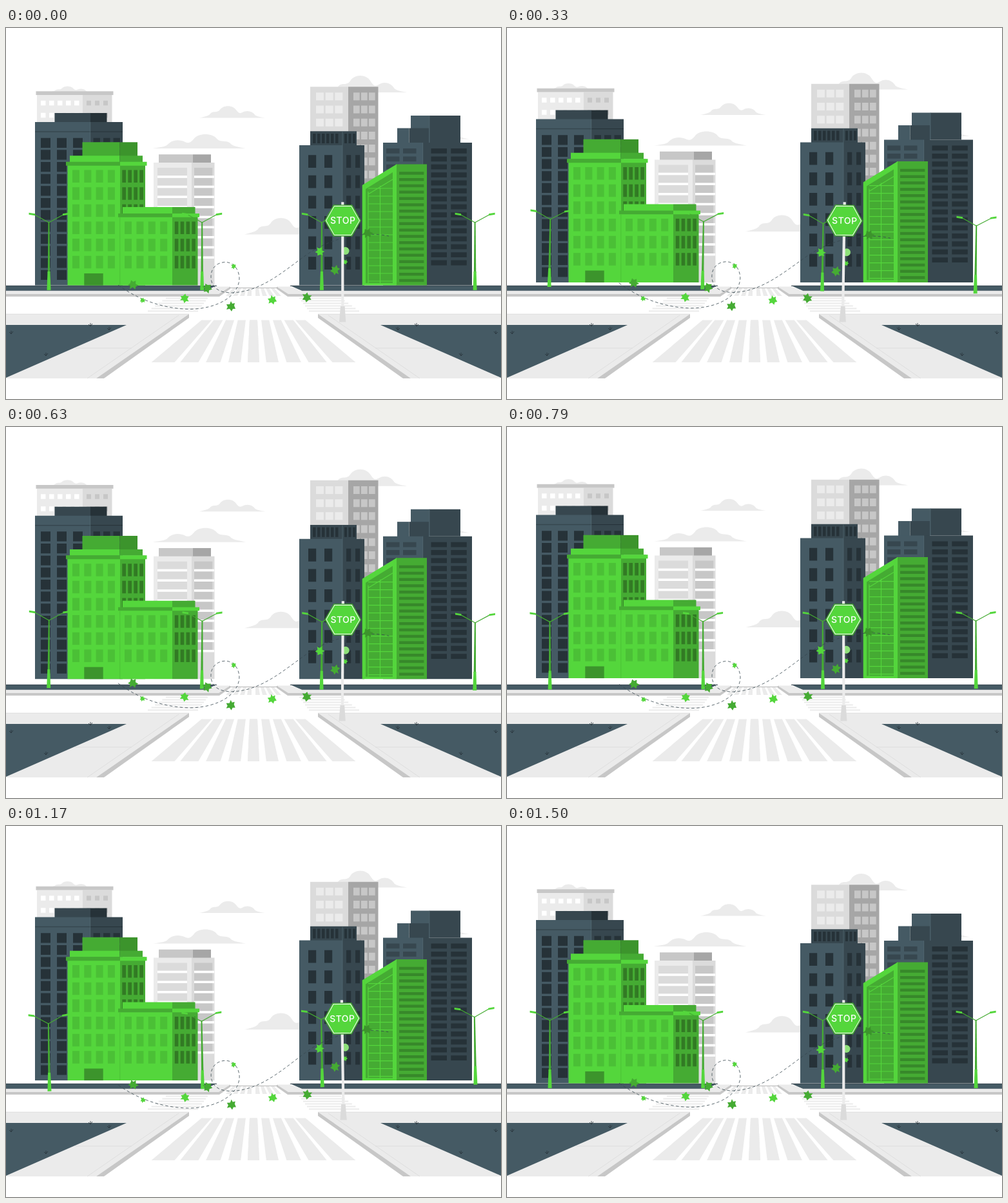
Recreate the animation shown at these times as an HTML page. Size 768x576 px, loop 1.54 s.

```html
<!DOCTYPE html>
<html lang="en">
<head>
<meta charset="utf-8">
<title>City crossing</title>
<style>
  html, body { margin: 0; width: 100%; height: 100%; overflow: hidden; background: #fff; }
  svg { display: block; width: 768px; height: 576px; }
</style>
</head>
<body>
<svg id="stage" viewBox="0 0 768 576"></svg>
<script>
const BRIGHT = '#54d63c', GREEN = '#45ab33', DEEP = '#3c942c', SHADE = '#327a24', SOFT = '#4bc036';
const SLATE = '#455a64', DARK = '#37474f', NIGHT = '#263238', SEAM = '#546a74';
const PALE = '#ebebeb', LIGHT = '#dbdbdb', GREY = '#c7c7c7', STONE = '#a6a6a6', WHITE = '#fff';
const BASE = 399.5;

const repeat = (count, draw) => Array.from({ length: count }, (_, i) => draw(i)).join('');
const path = (d, fill) => `<path d="${d}" fill="${fill}"/>`;
const poly = (points, fill) => path(`M${points}Z`, fill);
const line = (d, color, width = 1) => `<path d="${d}" fill="none" stroke="${color}" stroke-width="${width}"/>`;
const box = (x1, y1, x2, y2, fill) => path(`M${x1} ${y1}H${x2}V${y2}H${x1}Z`, fill);
const mirrored = shape => shape + `<g transform="matrix(-1 0 0 1 768 0)">${shape}</g>`;

// Two neighbouring faces of a block, split at x2
const block = (x1, x2, x3, top, bottom, left, right) =>
  box(x1, top, x2, bottom, left) + box(x2, top, x3, bottom, right);

// Each axis: [start, size, step, count]
const grid = ([x, w, dx, columns], [y, h, dy, rows], fill) =>
  path(repeat(rows, r => repeat(columns, c => `M${x + c * dx} ${y + r * dy}h${w}v${h}h${-w}z`)), fill);

// A negative width turns the cloud round
const cloud = (x, base, w, h) =>
  `<path transform="translate(${x} ${base}) scale(${w / 100} ${h / 18})" fill="${PALE}"
    d="M0 0C8-2 15-3 17-7C22-11 27-7 31-12C36-20 51-20 56-12C59-8 61-6 65-8C72-12 80-11 85-4C90-1 96-1 100 0Z"/>`;
const clouds = cloud(65, 100, 70, 9.5) + cloud(300, 139.5, 102, 18.3) + cloud(372, 187, -144, 22) +
  cloud(370, 320.5, 130, 25.5) + cloud(494, 100, 128, 26) + cloud(617, 172.5, 102, 18);

function leftTowers() {
  const small = [112.7, 7.5, 19, 2], tall = [170.7, 15.2, 18.65, 12];
  return block(48, 119, 164.5, 104, 150, PALE, LIGHT) + box(46.5, 98.3, 166.5, 104, GREY) +
    grid([54, 7.5, 13, 5], small, WHITE) + grid([125, 7, 13, 3], small, GREY) +
    block(75.5, 131, 156.5, 132, 147, DARK, NIGHT) +
    block(45, 131, 181, 146, BASE, SLATE, DARK) +
    line('M45 161H131', DARK, 1.5) + line('M131 161H181', NIGHT) + line(`M130.7 146V${BASE}`, SEAM, .7) +
    grid([54, 15, 25, 3], tall, NIGHT) + grid([135.5, 10.5, 15.5, 3], tall, NIGHT);
}

function paleOffice() {
  const bars = [217, 12.2, 15.65, 9], gaps = [229.2, 3.5, 15.65, 9];
  return block(237, 290, 318, 196.3, 210, GREY, STONE) + block(229, 288, 323.5, 209, BASE, PALE, LIGHT) +
    grid([235, 46, 0, 1], bars, LIGHT) + grid([292, 28.3, 0, 1], bars, GREY) +
    grid([235, 46, 0, 1], gaps, WHITE) + grid([292, 31, 0, 1], gaps, WHITE);
}

function greenHouses() {
  const tall = [220.5, 19.5, 26.65, 6], low = [300.5, 19.5, 26.65, 3];
  return block(118.5, 176.5, 204, 177.3, 199, GREEN, DEEP) + block(99, 176.5, 212, 198.3, 208, BRIGHT, GREEN) +
    block(95.5, 177, 216, 208, BASE, BRIGHT, GREEN) + block(93, 177, 218.5, 207.7, 213.7, GREEN, BRIGHT) +
    grid([103, 11, 18.3, 4], tall, SOFT) + grid([180.3, 5.7, 9, 4], tall, SHADE) +
    box(121.3, 381, 150.7, BASE, DEEP) +
    block(181, 258, 293.5, 278, 289, BRIGHT, GREEN) + block(177, 258, 297.5, 290, BASE, BRIGHT, GREEN) +
    block(174, 258, 300, 288, 293.7, GREEN, BRIGHT) + line(`M176.8 294V${BASE}`, SOFT) +
    grid([184, 11, 18.4, 4], low, SOFT) + grid([261.8, 5.6, 8.85, 4], low, SHADE);
}

function rightTowers() {
  const high = [100.3, 12, 20.2, 8], middle = [197.2, 19.8, 31.6, 6], slats = [164, 15, 0, 1];
  return block(472, 531, 577.5, 91.2, 250, LIGHT, STONE) +
    grid([481, 12, 14.7, 3], high, PALE) + grid([539, 9.7, 12, 3], high, GREY) +
    box(472, 160.3, 544, 183, DARK) + grid([476, 4.5, 7, 6], slats, NIGHT) + grid([525, 4, 6.5, 3], slats, NIGHT) +
    block(455, 522, 556, 182, BASE, SLATE, DARK) + line(`M522 161V${BASE}`, SEAM, .7) +
    grid([469, 12.2, 25, 2], middle, NIGHT) + grid([528, 7.2, 14, 2], middle, NIGHT) +
    block(628, 657, 705, 136, 178, SLATE, DARK) + block(607, 625.5, 656, 155.5, 179, SLATE, DARK) +
    block(585, 647, 723, 178, BASE, SLATE, DARK) + line('M657 136V178M646.7 178V212', SEAM, .7) +
    grid([590, 20.5, 26, 2], [187, 7.8, 12.4, 4], DARK) + grid([659.5, 24.5, 30.8, 2], [187, 7.8, 12.4, 15], NIGHT);
}

const greenGlass =
  box(605, 211.5, 653, BASE, GREEN) + poly(`552.7 244L606 211.5V${BASE}H552.7`, BRIGHT) +
  poly('558 250L600 224V396H558', GREEN) +
  line('M562 258L600 235M562 254V396M580.5 245V396' + repeat(13, i => `M562 ${249 + i * 12}H600`), BRIGHT, 1.2) +
  grid([610, 38.3, 0, 1], [223.2, 4.5, 9.8, 18], '#37882a');

const tuft = (x, y) => line(`M${x - 3} ${y - 1}L${x} ${y + 2}V${y - 3}M${x} ${y + 2}L${x + 3} ${y - 2}`, NIGHT, .8);
// Crossing stripe given by its middle and half width at both ends
const stripe = (a, halfA, b, halfB, top, bottom) =>
  poly(`${384 + a - halfA} ${top}H${384 + a + halfA}L${384 + b + halfB} ${bottom}H${384 + b - halfB}`, PALE);

const ground =
  mirrored(
    poly('0 400H327L309 408H0', SLATE) + line('M0 400.3H327', DARK) +
    poly('0 408H309L327 401.5H348L330 413H0', PALE) +
    poly('0 413H330L348 401.5V405L331 417H0', GREY) + line('M0 408.2H309', GREY, .6) +
    repeat(6, i => box(248 - 5.6 * i, 418.5 + 4 * i, 313 - 3 * i, 420.5 + 4 * i, PALE)) +
    repeat(4, i => stripe(5.5 + 8 * i, 2.5, 6.5 + 11 * i, 3.5, 404, 416)) +
    repeat(5, i => stripe(18.2 * i, 6 + .12 * i * i, 27.5 * i + 1.9 * i * i, 9 + .56 * i * i, 453.5, 519)) +
    poly('0 444H284L140 544H0', PALE) + poly('284 444V450L152 544H140', GREY) +
    poly('0 461H187L0 543', SLATE) +
    line('M0 444.2H284M126 544L268 446M107 497H195', LIGHT, .8) +
    tuft(8, 473) + tuft(62, 507) + tuft(131, 461) + tuft(160, 467)) +
  line('M347 403.5H421', STONE, .8);

const lampSide = side => `<g transform="scale(${side} 1)">` +
  line('M0 302L22 290', GREEN, 1.2) + poly('31 286.8L21.5 288.3V291.2L31 289.8', BRIGHT) + '</g>';
const lamp = i => `<g transform="translate(${66.5 + i * 211.7 + (i % 2) * 26})">` + lampSide(-1) + lampSide(1) +
  poly('-1 301H1L1.7 380H-1.7', GREEN) + poly('-2 378H2L3 407H-3', BRIGHT) + '</g>';

const leaf = ([x, y], size, turn, fill) =>
  `<path transform="translate(${x} ${y}) rotate(${turn}) scale(${size / 8})" fill="${fill}"
    d="M-7-4L-3-4-1-8 2-4 7-5 5-1 7 3 2 3 0 8-2 4-6 5-5 1Z"/>`;
const darkLeaves = [[197, 399], [312, 404], [349, 432], [467, 418], [511, 376], [561, 319]];
const brightLeaves = [[212, 423], [277, 420], [353, 370], [413, 422], [526, 363], [487, 347]];
const trail = 'M174 399C205 422 245 436 285 436.5C330 436 362 415 362 388C361 372 351 363.5 340 363.5' +
  'C326 364 318 374 318 386C318 403 330 411 350 411C395 410 430 378 465 353S550 314 594 323';
const breeze = `<path d="${trail}" fill="none" stroke="${DARK}" stroke-width=".8" stroke-dasharray="4.5 3.5"/>` +
  '<circle cx="526.5" cy="346" r="6" fill="#8ee07a"/>' +
  darkLeaves.map((at, i) => leaf(at, 8, 40 + i * 70, i < 5 ? GREEN : DEEP)).join('') +
  brightLeaves.map((at, i) => leaf(at, i % 2 ? 7.5 : 4.5, 20 + i * 50, BRIGHT)).join('');

const sign =
  box(520.2, 270.3, 524.4, 433, PALE) + poly('519 432H525.6L527.3 456.5H517', LIGHT) +
  poly('494 299L508 274.5H537L551 299L537 323.5H508', GREEN) +
  `<path d="M496.5 299L509.3 276.5H535.7L548.5 299L535.7 321.5H509.3Z" fill="${BRIGHT}" stroke="#fff"/>` +
  `<text x="522.8" y="304" text-anchor="middle" fill="#fff" font-family="Inter, sans-serif"
    font-size="14" font-weight="500" letter-spacing=".5">STOP</text>`;

const layer = (id, content) => `<g id="${id}">${content}</g>`;
const stage = document.getElementById('stage');
stage.innerHTML = ground +
  layer('city', clouds + leftTowers() + paleOffice() + greenHouses() + rightTowers() + greenGlass) +
  layer('lamps', repeat(4, lamp)) + layer('breeze', breeze) + layer('sign', sign);

const place = (id, transform) => document.getElementById(id).setAttribute('transform', transform);
const pivots = { lamps: '384 347', breeze: '384 378', sign: '522.5 363' };
const triangle = p => 1 - Math.abs(2 * (p % 1) - 1);

function draw(now) {
  // 24 steps per second; the 1.5 s cycle ends with one held step
  const phase = Math.floor((now % 1540 + 5) * .024) / 36;
  const sway = 2 * triangle(phase + .25) - 1;
  place('city', `translate(0 ${-10 * triangle(phase)})`);
  for (const id in pivots) place(id, `rotate(${sway} ${pivots[id]})`);
}

const start = performance.now();
function tick() {
  draw(performance.now() - start);
  requestAnimationFrame(tick);
}
tick();
</script>
</body>
</html>
```
